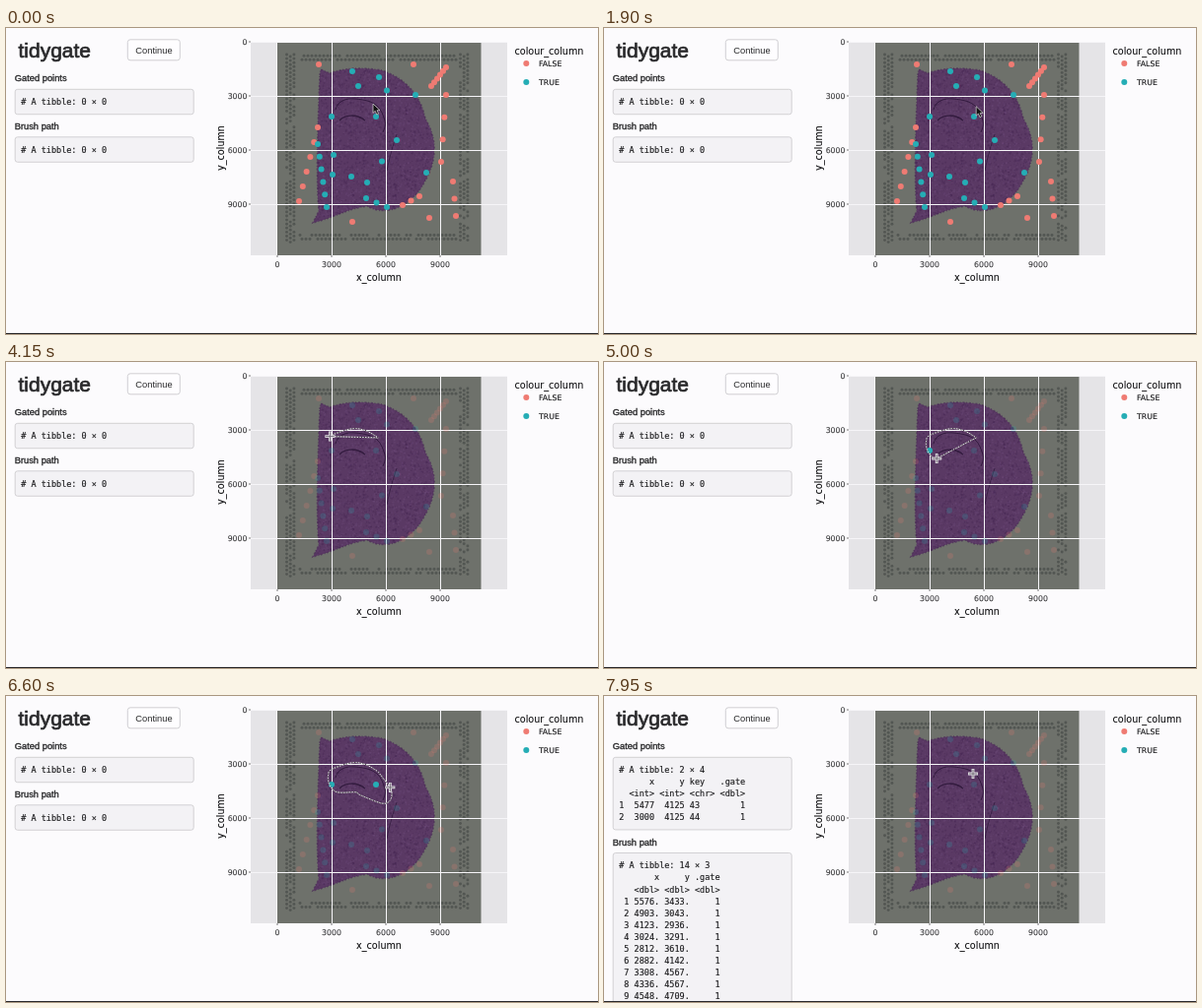
These frames come from a looping animation (600 by 311 pixels, 8000 ms). An HTML page with a canvas:

```html
<!DOCTYPE html>
<html lang="en">
<head>
<meta charset="utf-8">
<title>tidygate</title>
<style>
  html, body { margin: 0; width: 100%; height: 100%; overflow: hidden; background: #fcfbfd; }
  canvas, svg { position: absolute; left: 0; top: 0; width: 600px; height: 311px; }
  text { white-space: pre; }
  .ui { font: 9.33px "Liberation Sans", Arial, sans-serif; fill: #29292b; }
  .label { stroke: #29292b; stroke-width: .35px; }
  .title { font-size: 21px; stroke: #29292b; stroke-width: .7px; }
  .mono { font: 8.5px "DejaVu Sans Mono", monospace; fill: #1d1d1f; stroke: #1d1d1f; stroke-width: .15px; }
  .plot { font: 7.8px "DejaVu Sans", sans-serif; fill: #0c0c0e; stroke: #0c0c0e; stroke-width: .08px; }
  .tick { fill: #3c3c3e; }
  .axis { font-size: 9.6px; }
  .box { fill: #f3f2f5; stroke: #c9c8cb; stroke-width: .8px; }
  .no { fill: #ef7b73; }
  .yes { fill: #25adb5; }
</style>
</head>
<body>
<canvas id="slide" width="600" height="311"></canvas>
<svg id="stage" viewBox="0 0 600 311">
  <text class="ui title" x="12.5" y="29.5">tidygate</text>
  <rect x="123.3" y="11.8" width="53" height="21" rx="2.7" fill="#fefdff" stroke="#c6c5c8" stroke-width=".8"/>
  <text class="ui" x="150" y="25.5" text-anchor="middle">Continue</text>
  <text class="ui label" x="8.7" y="53.5">Gated points</text>
  <g id="empty"></g>
  <g id="filled"></g>

  <g id="axes"></g>
  <text class="plot axis" x="378" y="256.5" text-anchor="middle">x_column</text>
  <text class="plot axis" transform="translate(221.3 122) rotate(-90)" text-anchor="middle">y_column</text>
  <text class="plot axis" x="515.5" y="26.5">colour_column</text>
  <circle class="no" cx="527.3" cy="36" r="3"/><text class="plot" x="540" y="39">FALSE</text>
  <circle class="yes" cx="527.3" cy="55" r="3"/><text class="plot" x="540" y="58">TRUE</text>

  <g id="points"></g>
  <g id="lasso" fill="none">
    <path stroke="#f4f0f6"/>
    <path stroke="#333" stroke-dasharray="1.4"/>
  </g>

  <g id="modebar" fill="#b1b0b4" stroke="#b1b0b4" stroke-width="0">
    <path fill-rule="evenodd" d="M433 3.5h3l1-1.5h3l1 1.5h2.5v7H433zM438.3 4.7a2.2 2.2 0 1 0 .01 0z"/>
    <path fill="none" stroke-width="1.5" d="M458 2.2a3 3 0 1 0 .01 0zM460.3 7.5l3.2 3.2"/>
    <path fill="none" stroke-width="1.3" d="M475 2v9M470.500 6.500h9"/>
    <path fill="none" stroke="#6b6a6e" stroke-width="1.2" d="M488 8.5c-4-2-2-6.5 3-6.5s6 5 1 6.3c-3 .8-5-.8-4-1.5s2 1.7 0 4.5"/>
    <path fill="none" stroke-width="1.2" d="M507 4.5V2h9v2.5M507 8.5V11h9V8.5M509.500 4.500l4 4m0-4l-4 4"/>
    <path d="M521.5 6.8l5.5-5 5.5 5H531v4h-2.800V8h-2.400v2.800H523v-4z"/>
    <path fill="#77767a" d="M543 6.500l3-3h7.500v6H546z"/>
    <path d="M559.500 2.500h9v3h-9zm0 4.500h9v3h-9z"/>
    <rect x="579" y="1.5" width="10.5" height="10" fill="#3f4f75"/>
  </g>

  <path id="arrow" fill="#111" stroke="#ddd" stroke-width=".7" d="M0 0V9.4L2.2 7.3 3.8 11 5.600 10.200 4 6.700H7z"/>
  <g id="cross" fill="none">
    <path stroke="#e6e3e8" stroke-width="2.8" d="M-5 0H5M0-5V5"/>
    <path stroke="#68606c" stroke-width=".9" d="M-4.300 0H4.300M0-4.300V4.300"/>
  </g>
  <rect y="310" width="600" height="1" fill="#2a292c"/>
</svg>
<script>
const $ = id => document.getElementById(id);
const ctx = $('slide').getContext('2d');
const LOOP = 8000, PRESS = 3200, STEP = 295, CLEAR = 7800;

// Brush path in data units, also printed as a table
const brush = [[5576, 3433], [4903, 3043], [4123, 2936], [3024, 3291], [2812, 3610],
  [2882, 4142], [3308, 4567], [4336, 4567], [4548, 4709], [5755, 5182],
  [6218, 5045], [6327, 4582], [6136, 4091], [6055, 3927]];
const RELEASE = PRESS + STEP * (brush.length - 1), TABLES = RELEASE + 60;
const breaks = [0, 3000, 6000, 9000];
const toX = v => 275 + v * 55 / 3000, toY = v => 14 + v * 55 / 3000;
const mix = (a, b, u) => a + (b - a) * u;
const ease = u => { u = Math.min(1, Math.max(0, u)); return u * u * (3 - 2 * u); };

let seed = 7;
function rnd() {
  seed = (seed * 16807) % 2147483647;
  return seed / 2147483647;
}

function add(parent, tag, attrs, text) {
  const el = document.createElementNS('http://www.w3.org/2000/svg', tag);
  for (const k in attrs) el.setAttribute(k, attrs[k]);
  if (text) el.textContent = text;
  return parent.appendChild(el);
}

// Printed output
function output(parent, y, lines) {
  add(parent, 'rect', { class: 'box', x: 9.2, y, width: 181, height: 13.4 + lines.length * 12.05, rx: 2.5 });
  lines.forEach((line, i) =>
    add(parent, 'text', { class: 'mono', x: 15.2, y: y + 15.9 + i * 12.05 }, line));
}
function outputs(parent, gated, path, gap) {
  output(parent, 62.3, gated);
  add(parent, 'text', { class: 'ui label', x: 8.7, y: gap - 8 }, 'Brush path');
  output(parent, gap, path);
}
const none = ['# A tibble: 0 × 0'];
outputs($('empty'), none, none, 110.8);
outputs($('filled'), [
  '# A tibble: 2 × 4',
  '      x     y key   .gate',
  '  <int> <int> <chr> <dbl>',
  '1  5477  4125 43        1',
  '2  3000  4125 44        1'
], [
  '# A tibble: 14 × 3',
  '       x     y .gate',
  '   <dbl> <dbl> <dbl>',
  ...brush.map(([x, y], i) => `${i + 1}`.padStart(2) + ` ${x}. ${y}.     1`)
], 159.5);

for (const v of breaks) {
  const x = toX(v), y = toY(v);
  add($('axes'), 'text', { class: 'plot tick', x: 244.5, y: y + 2.9, 'text-anchor': 'end' }, `${v}`);
  add($('axes'), 'text', { class: 'plot tick', x, y: 242.8, 'text-anchor': 'middle' }, `${v}`);
  add($('axes'), 'path', { d: `M246 ${y}h2M${x} 231v2`, stroke: '#555', 'stroke-width': .8 });
}

// Tissue slide
function dot(x, y, r) {
  ctx.beginPath();
  ctx.arc(x, y, r, 0, 7);
  ctx.fill();
}
function stroke(d, width, color) {
  ctx.lineWidth = width;
  ctx.strokeStyle = color;
  ctx.stroke(new Path2D(d));
}
function fiducials() {
  ctx.fillStyle = 'rgba(60,63,62,.55)';
  const place = (x, y) => { if (rnd() > .13) dot(x, y, 1.45); };
  for (const top of [28.2, 210.5])
    for (let x = 298; x < 458; x += 4)
      for (const row of [0, 1]) place(x + row * 2, top + row * 4);
  for (const left of [284.5, 460.5])
    for (let y = 27; y < 217; y += 4.1)
      for (const col of [0, 1, 2]) place(left + col * 3.7, y + col % 2 * 2);
}
function drawTissue() {
  const outline = 'M318 48L319 42 328 46C344 40 362 40 381 43C406 52 420 68 425 92' +
    'C440 118 435 140 421 162C408 182 385 192 366 181C345 184 335 192 311 198L317 186C314 150 316 100 318 48Z';
  const tissue = new Path2D(outline);
  ctx.save();
  ctx.fillStyle = '#5a3964';
  ctx.fill(tissue);
  ctx.setLineDash([2, 1.5, 1, 2]);
  stroke(outline, 1.6, 'rgba(76,46,88,.7)');
  ctx.setLineDash([]);
  ctx.clip(tissue);
  for (let i = 0; i < 4200; i++) {
    ctx.fillStyle = i % 2 ? 'rgba(122,88,134,.2)' : 'rgba(50,24,64,.2)';
    dot(mix(308, 436, rnd()), mix(38, 200, rnd()), mix(.4, 1.2, rnd()));
  }
  const ink = 'rgba(35,15,48,.7)';
  stroke('M334 83C336 74 345 71 354 72S376 74 381 86 385 98 382 106', 1, ink);
  stroke('M338 94C343 88 355 87 364 94', 1.5, ink);
  stroke('M396 108C392 120 389 130 386 145', .8, ink);
  ctx.restore();
}
function drawSlide() {
  ctx.fillStyle = '#e5e4e7';
  ctx.fillRect(248, 14, 260, 217);
  ctx.fillStyle = '#6e716b';
  ctx.fillRect(275, 14, 206.5, 217);
  fiducials();
  drawTissue();
  ctx.fillStyle = '#f6f5f8';
  for (const v of breaks) {
    ctx.fillRect(toX(v) - (v ? 0 : 1), 14, 1, 217);
    ctx.fillRect(248, toY(v), 260, 1);
  }
}
drawSlide();

// Data points run in short, evenly spaced chains
const points = [];
function chain(cls, x1, y1, x2, y2, count) {
  for (let i = 0; i < count; i++) {
    const u = i / (count - 1), x = mix(x1, x2, u), y = mix(y1, y2, u);
    points.push({ x, y, el: add($('points'), 'circle', { class: cls, cx: x, cy: y, r: 3 }) });
  }
}
chain('no', 317, 37, 413, 37, 2);
chain('no', 446, 40, 431, 59, 6);
chain('no', 446, 68, 441, 136, 4);
chain('no', 316, 101, 297, 176, 6);
chain('no', 453, 156, 456, 191, 3);
chain('no', 402, 180, 419, 171, 3);
chain('no', 351, 197, 429, 193, 2);
chain('yes', 351, 44, 378, 50, 2);
chain('yes', 357, 59, 415, 68, 3);
chain('yes', 330, 90, 375, 90, 2);
chain('yes', 316, 118, 325, 182, 6);
chain('yes', 332, 129, 331, 149, 2);
chain('yes', 396, 114, 366, 157, 3);
chain('yes', 350, 151, 426, 147, 2);
chain('yes', 365, 173, 386, 182, 3);

// Catmull-Rom curve through the brush path
const knots = brush.map(([x, y]) => [toX(x), toY(y)]);
const last = knots.length - 1;
function brushAt(t) {
  const s = Math.min(last, (t - PRESS) / STEP), i = Math.min(last - 1, Math.floor(s)), u = s - i;
  const [a, b, c, d] = [-1, 0, 1, 2].map(k => knots[Math.min(last, Math.max(0, i + k))]);
  return [0, 1].map(k => b[k] + .5 * u * (c[k] - a[k]
    + u * (2 * a[k] - 5 * b[k] + 4 * c[k] - d[k]
    + u * (3 * (b[k] - c[k]) + d[k] - a[k]))));
}
function pointer(t) {
  if (t < PRESS) {
    const u = t / PRESS;
    return [mix(372, 377.2, ease(u * 1.7)), 77 + 3 * Math.sin(Math.PI * u) ** 2];
  }
  const [x, y] = brushAt(t), u = ease((t - 7400) / 400);
  return [mix(x, 374, u), mix(y, 79, u)];
}
function lassoPath(t) {
  const end = Math.min(t, RELEASE), list = [];
  for (let s = PRESS; s < end; s += 40) list.push(brushAt(s));
  list.push(brushAt(end));
  return 'M' + list.map(p => p.map(v => v.toFixed(2)).join(' ')).join('L') + 'Z';
}

const show = (id, on) => $(id).setAttribute('visibility', on ? 'visible' : 'hidden');

function render(now) {
  const t = now % LOOP;
  const brushing = t >= PRESS, drawn = brushing && t < CLEAR;
  const d = drawn ? lassoPath(t) : '';
  const area = new Path2D(d);
  for (const path of $('lasso').children) path.setAttribute('d', d);
  for (const { x, y, el } of points)
    el.setAttribute('opacity', !brushing || drawn && ctx.isPointInPath(area, x, y) ? 1 : .2);

  for (const id of ['arrow', 'cross'])
    $(id).setAttribute('transform', `translate(${pointer(t).join(' ')})`);
  show('arrow', !brushing);
  show('cross', brushing);
  show('empty', t < TABLES);
  show('filled', t >= TABLES);
  show('modebar', t >= RELEASE && t < CLEAR);
  requestAnimationFrame(render);
}
render(0);
</script>
</body>
</html>
```
